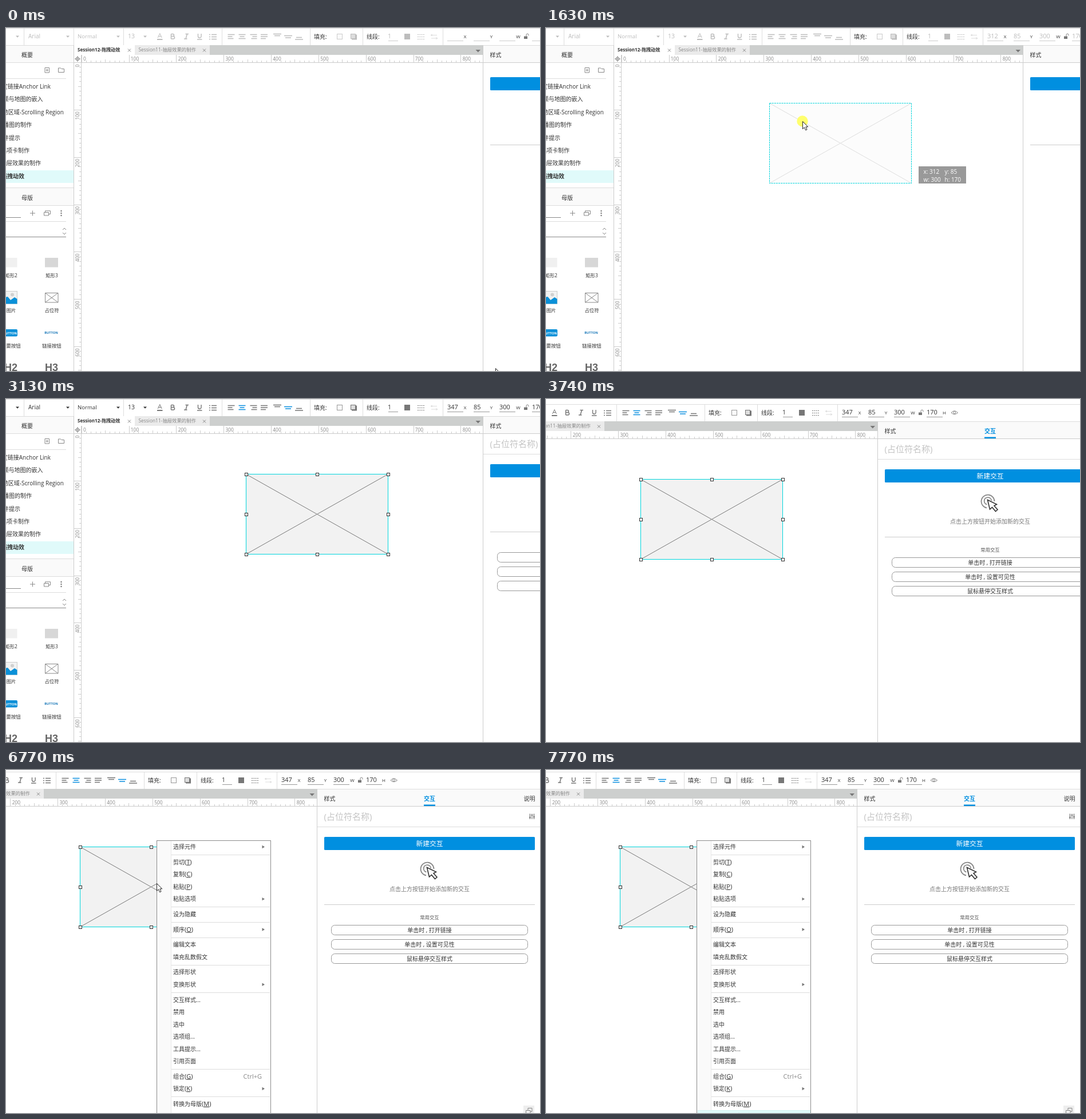
Write an HTML page that moves like this. It is 933x600 px and loops after 8000 ms.

```html
<!DOCTYPE html>
<html lang="zh-CN">
<head>
<meta charset="utf-8">
<title>拖拽动效</title>
<style>
html, body { margin: 0; width: 100%; height: 100%; overflow: hidden; background: #fff; }
svg { display: block; width: 933px; height: 600px; --ink: #bcbcbc; --icon: #bdbdbd; --pick: #bdbdbd; --rule: #ccc; }
svg.on { --ink: #333; --icon: #777; --pick: #0a8fe0; --rule: #999; }
text { font-family: "Open Sans", "Noto Sans CJK SC", "Noto Sans CJK", sans-serif; fill: #333; white-space: pre; }
.ink { fill: var(--ink); }
.icon { stroke: var(--icon); fill: none; }
.pick { stroke: var(--pick); fill: none; }
.solid { fill: var(--icon); }
.rule { stroke: var(--rule); }
.line { stroke: #ddd; fill: none; }
.grey { stroke: #888; fill: none; }
.num { fill: #888; }
.frame { stroke: #00d5dc; fill: none; }
.panel { transform: translateY(-28px); }
.on .panel { transform: none; }
.chosen { visibility: hidden; }
.on .chosen { visibility: visible; }
.key { text-decoration: underline; }
</style>
</head>
<body>
<svg id="stage" viewBox="0 0 933 600">
  <g id="world"></g>
  <g id="menu"></g>
  <g id="cursor">
    <circle id="press" r="9.7" fill="#ffff6e"/>
    <path id="arrow" d="M.5 .5V13.6L3.5 10.8 5.6 15.7 8 14.7 5.9 9.9H9.8Z" fill="#fff" stroke="#222"/>
    <path id="move" fill="#fff" stroke="#333" d="M0-9.5 3.3-6H1.3V-1.3H6V-3.3L9.5 0 6 3.3V1.3H1.3V6H3.3L0 9.5-3.3 6H-1.3V1.3H-6V3.3L-9.5 0-6-3.3V-1.3H-1.3V-6H-3.3Z"/>
  </g>
</svg>
<script>
const $ = id => document.getElementById(id);
const LOOP = 8000, SCALE = 0.8283, ORIGIN = { x: 132.2, y: 60.6 };
const range = n => [...Array(n).keys()];

// Text is placed by its vertical centre.
const text = (x, mid, str, size = 10, attrs = '') =>
  `<text x="${x}" y="${mid + size * 0.36}" font-size="${size}" ${attrs}>${str}</text>`;
const rect = (x, y, w, h, fill, attrs = '') =>
  `<rect x="${x}" y="${y}" width="${w}" height="${h}" fill="${fill}" ${attrs}/>`;
const path = (d, cls = 'line', attrs = '') => `<path d="${d}" class="${cls}" ${attrs}/>`;
const caret = (x, y, cls = 'solid') => path(`M${x - 3} ${y - 1.5}h6l-3 3.2z`, cls);
const MID = 'text-anchor="middle"', END = 'text-anchor="end"', BOLD = 'font-weight="700"';

function toolbar() {
  const seps = [31.5, 118.5, 205.5, 377.5, 531.5, 623.5, 763.5].map(x => `M${x} 1V30`).join('');
  let s = rect(0, 0, 1223, 30, '#fff') + path(`M0 .5H1223M0 30.5H1223${seps}`);
  s += [20, 108, 196, 243].map(x => caret(x, 15, 'ink')).join('');
  s += text(39, 14.5, 'Arial', 10, 'class="ink"') + text(125, 14.5, 'Normal', 9.6, 'class="ink"') +
    text(213, 14.5, '13', 10.5, 'class="ink"');
  s += path('M265.3 17 268.8 9.5 272.2 17M266.5 14.5H271', 'icon') + path('M264 20H273.5', 'icon', 'stroke-width="2"');
  s += path('M288.5 10.5V19M288.5 10.5H291.5a2 2 0 0 1 0 4H288.5M288.5 14.5H292.3a2.2 2.2 0 0 1 0 4.5H288.5M313.5 10.5H319M311 19H316.5M316.5 10.5 314 19', 'icon', 'stroke-width="1.5"');
  s += path('M335.5 10V14.5a2.8 2.8 0 0 0 5.6 0V10M334 20H342.5', 'icon', 'stroke-width="1.4"');
  s += path('M355 11.5h2M359 11.5h9M355 15.5h2M359 15.5h9M355 19.5h2M359 19.5h9', 'icon', 'stroke-width="1.5"');
  s += path('M387.5 11.5h12M387.5 15h8M387.5 18.5h10M426.5 11.5h12M430.5 15h8M428.5 18.5h10M445 11.5h12M445 15h12M445 18.5h9', 'icon', 'stroke-width="1.5"') +
    path('M406.5 11.5h12M408.5 15h8M406.5 18.5h12', 'pick', 'stroke-width="1.6"');
  s += path('M467 10.5h14M469 13.5h10M505 20h14M507 16.5h10', 'icon', 'stroke-width="1.4"') +
    path('M486 13.5h14M488 17h10', 'pick', 'stroke-width="1.6"');
  s += text(538, 15, '填充:') + text(630, 15, '线段:');
  s += rect(578.5, 10.5, 9, 9, '#fafafa', 'class="rule"') + rect(604, 11.5, 9, 9, 'var(--icon)') +
    rect(602.5, 10.5, 8, 8, '#ddd', 'class="icon" style="fill:#ddd"');
  s += text(667, 14.5, '1', 10.5, 'class="ink"') + path('M668 22.5H685', 'rule');
  s += rect(696, 10, 10, 10, 'var(--icon)') +
    path('M719 11.5H731M719 15.5H731M719 19.5H731', 'icon', 'stroke-dasharray="2 1.3"') +
    path('M742 12.5H753M745 11 742 12.5 745 14M743 18H754M751 16.5 754 18 751 19.5', 'line');
  [['vx', 771, 802, 'X'], ['vy', 817, 848, 'Y'], ['vw', 862, 895, 'W'], ['vh', 919, 950, 'H']].forEach(([id, x, lx, name]) => {
    s += text(x, 14.5, '', 11, `id="${id}" class="ink"`) + path(`M${x} 22.5h28`, 'rule') + text(lx, 15, name, 8, MID);
  });
  s += rect(905, 14.5, 6, 4.5, '#777') + path('M909 14.5V12a2 2 0 0 1 4 0v1.5', 'grey');
  return s + path('M962 15Q967.5 8.5 973.5 15Q967.5 20.5 962 15Z', 'grey') + '<circle cx="967.7" cy="14.7" r="2" class="grey"/>';
}

function sidebar() {
  let s = rect(0, 31, 118, 569, '#fff') + rect(0, 31, 118, 29, '#fafafa') + rect(0, 280, 118, 30, '#fafafa');
  s += rect(0, 249, 118, 22, '#e0fafa');
  s += path('M0 60.5H118M0 88.5H105M0 279.5H118M0 310.5H118M0 338.5H105');
  s += text(37, 47, '概要', 10, MID) + text(37, 297, '母版', 10, MID);
  s += path('M68 69.5H75.5V78H68ZM69.5 73.7H74M71.8 71.5V76M91.5 70H95.5L97 71.5H101.5V77.5H91.5Z', 'grey');
  const pages = [['锁定链接Anchor Link', 78], ['视频与地图的嵌入', 64.5], ['滚动区域-Scrolling Region', 101], ['轮播图的制作', 45],
    ['元件提示', 25], ['选项卡制作', 41], ['抽屉效果的制作', 61], ['拖拽动效', 32]];
  pages.forEach(([name, x], i) => s += text(x, 102.5 + i * 22.35, name, 10, END + (i === 7 ? ' ' + BOLD : '')));
  s += path('M0 331.5H26M42 324H51M46.5 319.5V328.5M66.5 322.5H74.5V328H66.5ZM68.5 322V319.8H77.5V325.5H75M0 365.5H105M99 353 102 350 105 353M99 358 102 361 105 358', 'grey');
  s += [320, 324, 328].map(y => `<circle cx="96.5" cy="${y}" r="1.2" fill="#777"/>`).join('');
  s += rect(-4, 402, 23.5, 16.5, '#f0f0f0') + rect(68, 402, 23, 16.5, '#d7d7d7');
  s += rect(-4, 460.5, 23.5, 22, '#f2f2f2', 'stroke="#ccc"') + '<circle cx="11" cy="466.5" r="3" fill="#d0d0d0"/>' +
    '<path d="M-4 472 3 470 8 476 15 471 19.5 474V482.5H-4Z" fill="#0a90d8"/>';
  s += path('M68.5 463.5H91V480H68.5ZL91 480M91 463.5 68.5 480', 'grey');
  s += rect(-6, 527, 26, 12.5, '#0a90d8', 'rx="2"') + text(19, 533.5, 'BUTTON', 5.6, `${END} ${BOLD} style="fill:#fff"`);
  s += text(79, 533, 'BUTTON', 5.6, `${MID} ${BOLD} style="fill:#1a78b8"`);
  [['矩形2', '矩形3'], ['图片', '占位符'], ['主要按钮', '链接按钮']].forEach(([a, b], i) => {
    s += text(9, 433 + i * 61.3, a, 8.4, MID) + text(80, 433 + i * 61.3, b, 8.4, MID);
  });
  const head = `${BOLD} style="fill:#666;font-family:'Liberation Sans',sans-serif"`;
  return s + text(-3, 594, 'H2', 18, head) + text(68, 594, 'H3', 18, head);
}

function canvasArea() {
  let s = rect(118, 31, 715, 569, '#fff') + rect(118, 30, 715, 17, '#cdcfce') + rect(119, 30, 106, 17, '#fff') + rect(225, 30, 131, 17, '#ebebeb');
  s += text(125, 38.3, 'Session12-拖拽动效', 8.1, BOLD) + text(231.5, 38.3, 'Session11-抽屉效果的制作', 8.4, 'class="num"');
  s += [215.5, 346.5].map(x => path(`M${x - 2.5} 36.5l5 5m0-5l-5 5`, 'grey')).join('') + path('M820.5 38h8.5l-4.2 4.5z', '', 'fill="#777"');
  let ticks = 'M118 60.5H833M131.5 47V600';
  range(85).forEach(i => {
    const x = Math.floor(ORIGIN.x + i * 10 * SCALE) + .5, y = Math.floor(ORIGIN.y + i * 10 * SCALE) + .5;
    const len = i % 10 === 0 ? 13 : i % 5 === 0 ? 5 : 3;
    if (x < 832) ticks += `M${x} 60v${-len}`;
    if (y < 602) ticks += `M131 ${y}h${-len}`;
  });
  s += path(ticks, 'line', 'style="stroke:#ccc"');
  range(9).forEach(i => {
    const d = i * 100 * SCALE;
    s += text(ORIGIN.x + d + 2.8, 53.8, i * 100, 8.4, 'class="num"');
    if (i < 7) s += `<g transform="translate(125 ${ORIGIN.y + d + (i ? 10 : 5.5)}) rotate(-90)">${text(0, 0, i * 100, 8.4, MID + ' class="num"')}</g>`;
  });
  s += '<circle cx="125" cy="54" r="3" class="grey"/>' + path('M120 54H130M125 49V59', 'grey');
  s += path('M118.5 30V600', 'line', 'style="stroke:#ccc"');
  return s + rect(825, 326, 6, 23, '#d6d6d6', 'rx="2.5" id="thumb"');
}

function rightPanel() {
  let s = rect(834, 31, 389, 569, '#fff') + rect(834, 31, 389, 29, '#fafafa') + path('M833.5 30V620M834 60.5H1223', 'line', 'style="stroke:#ccc"');
  s += text(855.5, 47, '样式', 10, MID) + text(1030, 47, '交互', 10, `${MID} ${BOLD} style="fill:#008fe0"`) + text(1204.5, 47, '说明', 10, MID);
  s += rect(1020, 57.5, 20, 2.5, '#008fe0');
  s += `<g class="chosen">${text(845.5, 78.5, '(占位符名称)', 15, 'style="fill:#c4c4c4"')}${path('M834 96.5H1223')}
    ${path('M1205.5 73.5V83M1209 73.5V83M1212.5 73.5V83M1204 80h3M1207.5 76h3M1211 79h3', 'grey', 'style="stroke:#555"')}</g>`;
  let body = rect(846, 114, 368, 23, '#008fe0', 'rx="1.5"') + text(1030, 125.3, '新建交互', 11.8, `${MID} style="fill:#fff"`);
  body += path('M1024 181.5A11.5 11.5 0 1 1 1037.5 170M1024.5 175.5A6.3 6.3 0 1 1 1032.3 169', 'grey', 'stroke-width="1.8"') +
    '<path d="M1025.5 167.5 1029.5 184 1033.5 180.5 1039.5 187.5 1043 184.5 1037 177.8 1041.5 175.2Z" fill="#fff" stroke="#333" stroke-width="1.6"/>';
  body += text(1030, 205.5, '点击上方按钮开始添加新的交互', 10, `${MID} style="fill:#777"`) + path('M846 232.5H1214', 'line', 'style="stroke:#ccc"');
  let common = text(1030, 255, '常用交互', 8.4, `${MID} style="fill:#555"`);
  ['单击时 , 打开链接', '单击时 , 设置可见性', '鼠标悬停交互样式'].forEach((label, i) => {
    const y = 277 + i * 25;
    common += rect(858.5, y - 8.5, 343, 17, '#fff', 'rx="6" stroke="#999"') + text(1030, y, label, 10, MID);
  });
  s += `<g class="panel">${body}<g class="chosen">${common}</g></g>`;
  return s + rect(1194, 584, 19, 20, '#eee') + path('M1198.5 592.5H1206V598H1198.5ZM1202 592V588.5H1209V594.5H1206', 'grey');
}

// The placeholder, 300 x 170 units, snapped to whole pixels.
const W = Math.floor(300 * SCALE), H = Math.floor(170 * SCALE);
const cross = `M0 0L${W} ${H}M${W} 0L0 ${H}`, outline = `M0 0H${W}V${H}H0Z`;
function widget() {
  let s = rect(0, 0, W, H, '#f2f2f2') + path(cross, 'grey', 'style="stroke:#777"') + path(outline, 'frame');
  [0, W / 2, W].forEach(x => [0, H / 2, H].forEach(y => {
    if (x !== W / 2 || y !== H / 2) s += rect(x - 2, y - 2, 5, 5, '#fff', 'stroke="#333"');
  }));
  return `<g id="widget">${s}</g>`;
}
function ghost() {
  return `<g id="ghost">${rect(0, 0, W, H, '#fcfcfc')}${path(cross)}
    ${path(outline, 'frame', 'stroke-dasharray="3 1.2"')}
    ${rect(260.5, 110.5, 83, 30, '#999')}
    <g style="--ink:#fff">${text(269, 119.5, '', 10, 'id="tx" class="ink"')}${text(306, 119.5, '', 10, 'id="ty" class="ink"')}
    ${text(269, 133.5, 'w: 300', 10, 'class="ink"')}${text(306, 133.5, 'h: 170', 10, 'class="ink"')}</g></g>`;
}

// "|" starts a new group, "_" marks the shortcut letter, ">" a submenu.
const groups = '选择元件>|剪切_T 复制_C 粘贴_P 粘贴选项>|设为隐藏|顺序_O>|编辑文本 填充乱数假文|选择形状 变换形状>|交互样式... 禁用 选中 选项组... 工具提示... 引用页面|组合_G 锁定_K>|转换为母版_M 转换为动态面板_D'
  .split('|').map(g => g.split(' '));
const rowMids = [];
function menu() {
  let y = 134.5, items = '';
  groups.forEach((group, g) => {
    group.forEach(item => {
      const label = item.replace('>', '').replace(/_(.)/, '<tspan font-size="11">(<tspan class="key">$1</tspan>)</tspan>');
      items += text(292, y, label);
      if (item.endsWith('>')) items += path(`M447.5 ${y - 2.7}l4.5 2.7l-4.5 2.7z`, '', 'fill="#777"');
      if (item === '组合_G') items += text(447, y, 'Ctrl+G', 11, END + ' class="num"');
      rowMids.push(y);
      y += 21.5;
    });
    if (g < groups.length - 1) items += path(`M289 ${Math.round(y - 7.8) + .5}H461`);
    y += 5.15;
  });
  return rect(263.5, 123.5, 199, 500, '#fff', 'stroke="#8c8c8c"') + rect(264, 124, 24, 500, '#fafafa') + path('M288.5 124V600', 'line', 'style="stroke:#e8e8e8"') +
    rect(265.5, 0, 196, 21, '#e0fafa', 'id="bar" stroke="#d2f0f0"') + items;
}

$('world').innerHTML = toolbar() + sidebar() + canvasArea() + rightPanel() + widget() + ghost();
$('menu').innerHTML = menu();

// Timed poses; each one holds until the next.
const views = [[0, 0, 0], [3740, -254, 9], [4210, -290, 3]];
const drags = [[1160, 157, 277], [1240, 205, 176], [1320, 252, 112], [1400, 280, 90], [1480, 293, 85],
  [1630, 312, 85], [1710, 334, 85], [1790, 347, 85]];
const moves = [
  [0, 'arrow', 855, 595], [70, 'arrow', 770, 562], [147, 'arrow', 600, 512], [225, 'arrow', 410, 474], [302, 'arrow', 250, 450], [380, 'arrow', 178, 442],
  [530, 'arrow', 150, 450], [610, 'arrow', 114, 462], [690, 'arrow', 92, 470], [770, 'arrow', 82, 474], [850, 'arrow', 79, 474],
  [1080, 'arrow', 175, 380], [1160, 'arrow', 307, 233], [1240, 'arrow', 375, 190], [1320, 'arrow', 410, 170], [1400, 'arrow', 422, 165], [1480, 'arrow', 431, 163],
  [1630, 'arrow', 448, 163], [1710, 'arrow', 466, 163], [1790, 'arrow', 476, 163],
  [2010, 'move', 476, 163], [2483, 'move', 486, 160], [2562, 'move', 502, 156], [2641, 'move', 516, 152], [2720, 'move', 524, 150],
  [2950, 'arrow', 690, 100], [3040, 'arrow', 780, 55], [3130, 'none', 0, 0],
  [5370, 'arrow', 386, 72], [5449, 'arrow', 374, 98], [5527, 'move', 335, 145], [5606, 'move', 280, 172], [5684, 'move', 236, 190], [5763, 'move', 212, 198], [5841, 'move', 240, 200], [5920, 'move', 263, 198],
  [6680, 'arrow', 263, 198], [7080, 'arrow', 266, 222], [7157, 'arrow', 276, 290], [7233, 'arrow', 294, 380], [7310, 'arrow', 307, 437],
  [7387, 'arrow', 308, 446], [7463, 'arrow', 309, 470], [7540, 'arrow', 311, 515], [7617, 'arrow', 314, 555], [7693, 'arrow', 316, 588], [7770, 'arrow', 318, 603]];
const pose = (list, t) => list.findLast(p => p[0] <= t);
const within = (t, a, b) => t >= a && t < b;
const show = (id, yes) => $(id).style.display = yes ? '' : 'none';
const place = (id, x, y) => $(id).setAttribute('transform', `translate(${x} ${y})`);

function draw() {
  const t = performance.now() % LOOP;
  const [, vx, vy] = pose(views, t);
  const [, kind, cx, cy] = pose(moves, t);
  const drag = pose(drags, t);
  const on = t >= 2010, menuOpen = t >= 6680;

  $('stage').classList.toggle('on', on);
  place('world', vx, vy);
  place('cursor', cx, cy);
  show('arrow', kind === 'arrow');
  show('move', kind === 'move');
  show('press', within(t, 1080, 2010));
  show('thumb', within(t, 147, 610) || within(t, 2010, 3130) || within(t, 5370, 6680));
  show('widget', on);
  show('ghost', drag && !on);

  const [, x, y] = drag || [];
  if (drag) {
    const left = Math.floor(ORIGIN.x + x * SCALE) + .5, top = Math.floor(ORIGIN.y + y * SCALE) + .5;
    place('widget', left, top);
    place('ghost', left, top);
    $('tx').textContent = 'x: ' + x;
    $('ty').textContent = 'y: ' + y;
  }
  [['vx', x], ['vy', y], ['vw', 300], ['vh', 170]].forEach(([id, v]) => $(id).textContent = drag ? v : '');

  show('menu', menuOpen);
  const row = rowMids.find(m => Math.abs(cy - m) <= 10.75);
  show('bar', cx > 264 && row);
  if (row) $('bar').setAttribute('y', Math.round(row - 10.75) + .5);
  requestAnimationFrame(draw);
}
draw();
</script>
</body>
</html>
```
